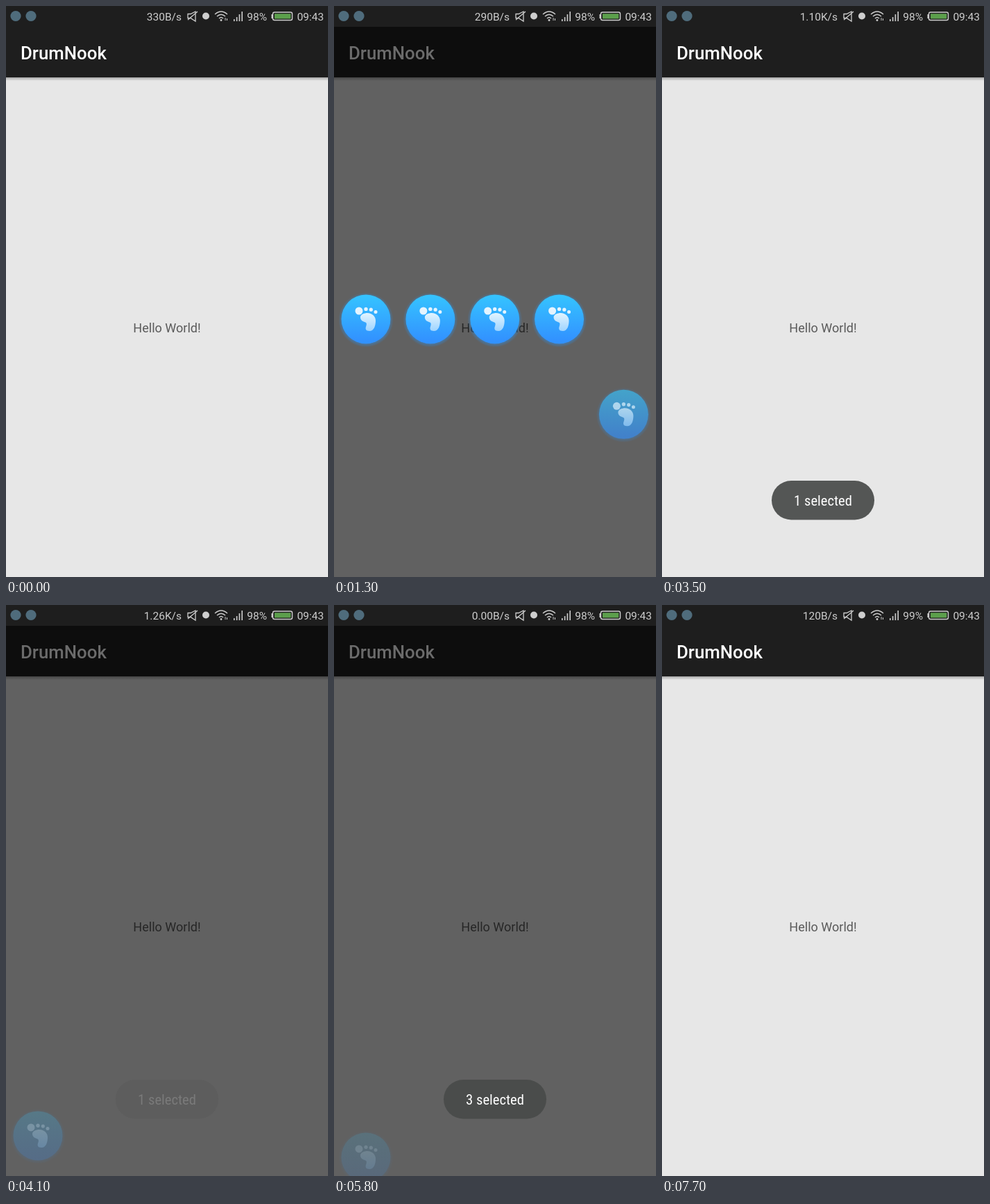
An HTML page with a canvas that plays this animation: 464x824 px, repeating every 8 s.

```html
<!DOCTYPE html>
<html lang="en">
<head>
<meta charset="utf-8">
<title>Staggered menu</title>
<style>
html, body { margin: 0; width: 100%; height: 100%; overflow: hidden; background: #e7e7e7; }
canvas { display: block; width: 464px; height: 824px; }
</style>
</head>
<body>
<canvas id="stage" width="464" height="824"></canvas>
<script>
const ctx = document.getElementById('stage').getContext('2d');
const W = 464, H = 824, LOOP = 8000, STEP = 100;
const STAGGER = 84, TRAVEL_TIME = 3 * STAGGER, TRAVEL = 412, REST_Y = 452;
const LIGHT = '#cecece', BADGE = '#4f6c7c';

const speeds = [[0, '330B/s'], [500, '290B/s'], [3200, '1.10K/s'],
                [4100, '1.26K/s'], [4900, '0.00B/s'], [6400, '120B/s']];
const menus = [
  { open: 796, close: 2006, maskIn: [650, 800], maskOut: [2590, 2600] },
  { open: 4040, close: 5253, maskIn: [3900, 4050], maskOut: [5820, 6000] }
];
const toasts = [
  { text: '1 selected', show: [1850, 2150], hide: [3650, 4200] },
  { text: '3 selected', show: [5230, 5500], hide: [6850, 7450] }
];

const sole = new Path2D('M-8-3C-8-7-2-9 2-9C9-9 14-4 14 2C14 9 12 17 5 17' +
  'C0 17-1 14 0 11C1 8 2 5-2 4C-5 3-8 1-8-3Z');
const toes = [[-10, -12, 5.5], [0, -14.6, 2.7], [7.3, -13.8, 2.6], [14, -10.5, 2.5]];

const ramp = (t, [from, to]) => Math.min(1, Math.max(0, (t - from) / (to - from)));
const pulse = (t, rise, fall) => ramp(t, rise) * (1 - ramp(t, fall));

function vertical(y0, y1, top, bottom) {
  const g = ctx.createLinearGradient(0, y0, 0, y1);
  g.addColorStop(0, top);
  g.addColorStop(1, bottom);
  return g;
}

function rect(x, y, w, h, color) {
  ctx.fillStyle = color;
  ctx.fillRect(x, y, w, h);
}

function disc(x, y, r, color) {
  ctx.fillStyle = color;
  ctx.beginPath();
  ctx.arc(x, y, r, 0, 7);
  ctx.fill();
}

function text(str, x, y, font, color, align = 'left') {
  ctx.font = font;
  ctx.fillStyle = color;
  ctx.textAlign = align;
  ctx.fillText(str, x, y);
}

function stroke(path, width = 1.3) {
  ctx.strokeStyle = LIGHT;
  ctx.lineWidth = width;
  ctx.stroke(new Path2D(path));
}

function roundRect(x, y, w, h, r) {
  ctx.beginPath();
  ctx.roundRect(x, y, w, h, r);
}

function drawPage() {
  rect(0, 0, W, H, '#e7e7e7');
  rect(0, 103, W, 5, vertical(103, 108, '#a8a8a8', '#e7e7e7'));
  rect(0, 0, W, 103, '#1e1e1e');
  text('DrumNook', 21, 77, '500 25.8px Roboto, sans-serif', '#fff');
  text('Hello World!', 232, 470.5, '18.05px Roboto, sans-serif', '#5b5b5b', 'center');
}

function drawStatus(t) {
  const font = '15.5px Roboto, sans-serif';
  const speed = speeds.filter(([from]) => t >= from).pop()[1];
  rect(0, 0, W, 30, '#1e1e1e');
  disc(14, 14.5, 7.6, BADGE);
  disc(36, 14.5, 7.6, BADGE);
  text(speed, 253, 21, font, LIGHT, 'right');
  text(t < 6400 ? '98%' : '99%', 376, 21, font, LIGHT, 'right');
  text('09:43', 458, 21, font, LIGHT, 'right');

  stroke('M262 11.500H266L273 8V22L266 17.500H262ZM262 20L276 8');
  disc(288, 14.5, 5, LIGHT);
  stroke('M301 12Q310 4 319 12M304 15Q310 9.500 316 15M307 18Q310 15 313 18', 1.3);
  disc(310, 20.5, 1.4, LIGHT);
  stroke('M316 17V21M318.500 18V21', 1);
  [3, 6, 10, 14].forEach((h, i) => rect(328 + 3.8 * i, 22 - h, 1.6, h, LIGHT));

  rect(382.5, 12, 2, 6, LIGHT);
  ctx.strokeStyle = LIGHT;
  ctx.lineWidth = 1.4;
  roundRect(384.5, 9, 28, 11.5, 2.5);
  ctx.stroke();
  rect(387, 11.2, 23.3, 7.2, '#5c9f4c');
}

// A glow outside the rim only, so that a fading disc keeps an even tint.
function drawGlow(radius) {
  const g = ctx.createRadialGradient(0, 1, radius - 1, 0, 1, radius + 4);
  g.addColorStop(0, 'rgba(50,140,220,.5)');
  g.addColorStop(1, 'rgba(50,140,220,0)');
  ctx.fillStyle = g;
  ctx.beginPath();
  ctx.arc(0, 1, radius + 4, 0, 2 * Math.PI);
  ctx.closePath();
  ctx.moveTo(radius, 0);
  ctx.arc(0, 0, radius, 0, 2 * Math.PI);
  ctx.fill('evenodd');
}

function drawButton(x, y, alpha) {
  ctx.save();
  ctx.globalAlpha = alpha;
  ctx.translate(x, y);
  drawGlow(35.5);
  disc(0, 0, 35.5, vertical(-35, 30, '#35c4ff', '#3292ff'));
  toes.forEach(([tx, ty, r]) => disc(tx, ty, r, '#e4f4ff'));
  ctx.fillStyle = vertical(-9, 17, '#e2f4ff', '#9fd4ff');
  ctx.fill(sole);
  ctx.restore();
}

function drawMenu(t, menu) {
  const shade = pulse(t, menu.maskIn, menu.maskOut);
  if (!shade) return;
  rect(0, 30, W, H - 30, `rgba(0,0,0,${0.58 * shade})`);
  for (let i = 0; i < 5; i++) {
    const rise = menu.open + i * STAGGER;
    const drop = menu.close + (4 - i) * STAGGER;
    const shown = pulse(t, [rise, rise + TRAVEL_TIME], [drop, drop + TRAVEL_TIME]);
    if (shown) drawButton(46 + 92.85 * i, REST_Y + TRAVEL * (1 - shown), shown);
  }
}

function drawToast(t, toast) {
  const alpha = pulse(t, toast.show, toast.hide);
  if (!alpha) return;
  ctx.save();
  ctx.globalAlpha = alpha;
  ctx.fillStyle = 'rgba(73,75,74,.925)';
  roundRect(158, 685, 148, 56.5, 28.2);
  ctx.fill();
  // Condensed lettering when the family has it, a smaller regular size otherwise.
  const condensed = 'condensed 20.6px "Roboto Condensed", Roboto, sans-serif';
  ctx.font = condensed;
  const fits = ctx.measureText(toast.text).width < 88;
  text(toast.text, 232, 721, fits ? condensed : '18.05px Roboto, sans-serif', '#fff', 'center');
  ctx.restore();
}

const start = performance.now();

function draw() {
  const elapsed = (performance.now() - start) % LOOP;
  const t = Math.floor(elapsed / STEP) * STEP;
  drawPage();
  menus.forEach(menu => drawMenu(t, menu));
  drawStatus(t);
  toasts.forEach(toast => drawToast(t, toast));
  requestAnimationFrame(draw);
}
draw();
</script>
</body>
</html>
```
